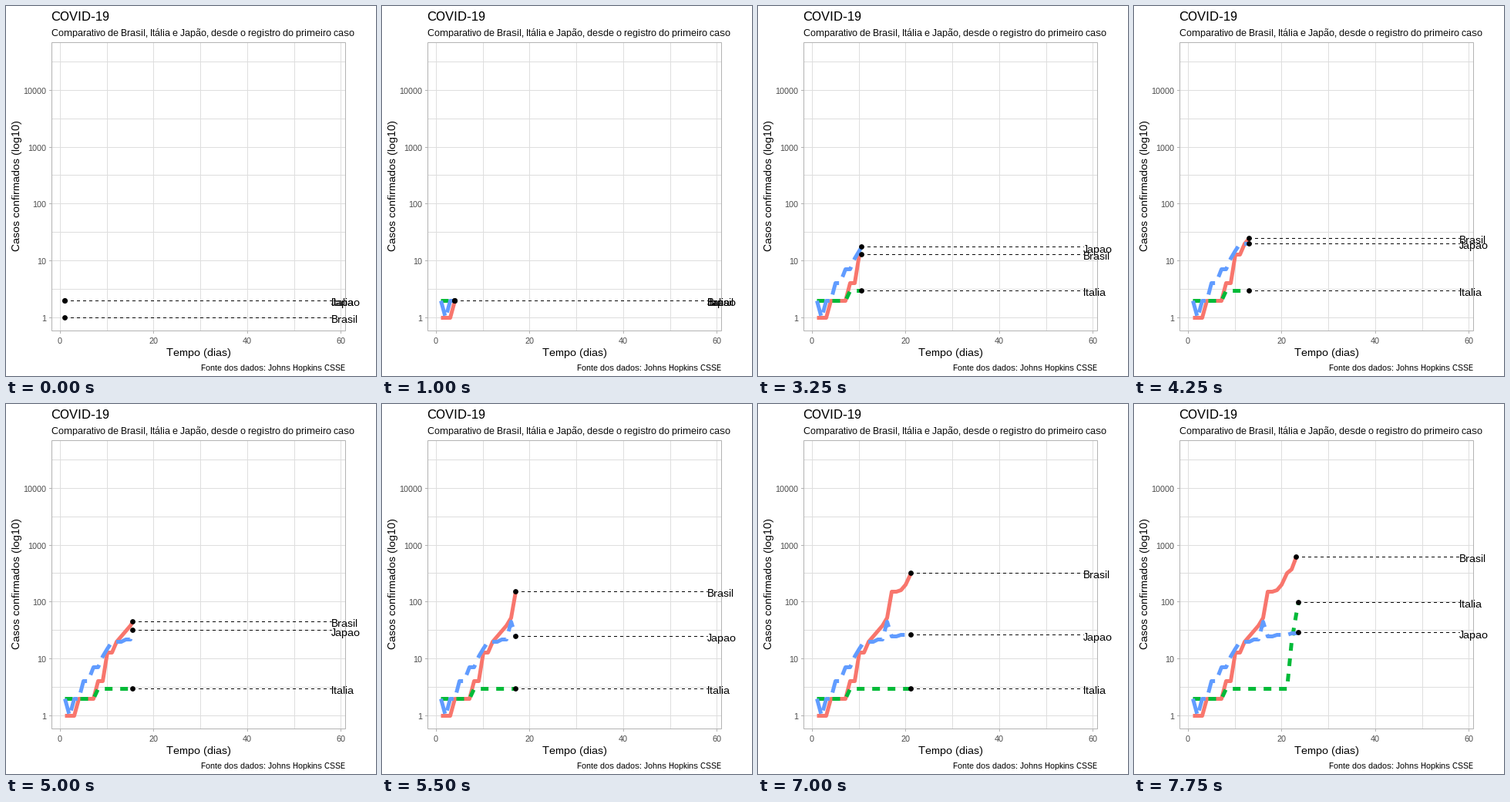
These frames come from a looping animation (480x480 px, 8 s). A matplotlib script:

```python
import numpy as np
import matplotlib.pyplot as plt
from matplotlib.animation import FuncAnimation
from matplotlib.patches import Circle, Rectangle

plt.rcParams.update({
    "font.family": "Liberation Sans",
    "text.hinting": "native",
    "text.hinting_factor": 1,
    "text.kerning_factor": 6,
})

SIZE = 480
LEFT, RIGHT, TOP, BOTTOM = 59.3, 440, 47, 421.3
FRAMES, INTERVAL = 32, 250
LAST_DAY, LAST_FRAME = 58, 79
MAX_CASES = 41035
GRID, BORDER, TICK_TEXT = "#DEDEDE", "#B3B3B3", "#4D4D4D"

# name: (line colour, line style, cumulative cases by day)
SERIES = {
    "Brasil": ("#F8766D", "-", [1, 1, 1, 2, 2, 2, 2, 4, 4, 13, 13, 20, 25, 31,
                                38, 52, 151, 151, 162, 200, 321, 372, 621]),
    "Italia": ("#00BA38", (0, (2, 2)), [2] * 7 + [3] * 14 + [20, 62, 155]),
    "Japao": ("#619CFF", (0, (4, 2)), [2, 1, 2, 2, 4, 4, 7, 7, 11, 15, 20, 20,
                                       20, 22, 22, 45, 25, 25, 26, 26, 26, 28,
                                       28, 29]),
}

DAYS = np.arange(1, LAST_DAY + 1)
KEYS = np.round((DAYS - 1) * LAST_FRAME / (LAST_DAY - 1))


def px(day):
    span = LAST_DAY - 1
    return LEFT + (day - 1 + 0.05 * span) / (1.1 * span) * (RIGHT - LEFT)


def py(log_cases):
    span = np.log10(MAX_CASES)
    return BOTTOM - (log_cases + 0.05 * span) / (1.1 * span) * (BOTTOM - TOP)


def center(v):
    """Middle of the pixel that holds v."""
    return np.floor(v) + 0.5


fig = plt.figure(figsize=(SIZE / 72, SIZE / 72), dpi=72, facecolor="white")
ax = fig.add_axes([0, 0, 1, 1])
ax.set_xlim(0, SIZE)
ax.set_ylim(SIZE, 0)
ax.axis("off")


def stroke(x, y, color, z=1, lw=1, ls="-"):
    return ax.plot(x, y, color=color, zorder=z, lw=lw, ls=ls, snap=False,
                   solid_capstyle="butt", dash_capstyle="butt",
                   solid_joinstyle="round", dash_joinstyle="round")[0]


def label(x, y, text, size, ha="left", color="black", **kw):
    return ax.text(x, y, text, fontsize=size, ha=ha, va="baseline",
                   color=color, zorder=8, **kw)


# Grid, ticks and border
for day in range(0, 61, 10):
    x = center(px(day))
    stroke([x, x], [TOP, 421], GRID)
    if day % 20 == 0:
        stroke([x, x], [421, 425], BORDER)
        label(np.floor(x), 438, str(day), 11, "center", TICK_TEXT)

for half in range(10):
    y = center(py(half / 2))
    stroke([59, RIGHT], [y, y], GRID)
    if half % 2 == 0:
        stroke([56, 59], [y, y], BORDER)
        label(52, y + 4.5, str(10 ** (half // 2)), 11, "right", TICK_TEXT)

ax.add_patch(Rectangle((59.5, 47.5), 381, 374, fill=False, ec=BORDER, lw=1,
                       zorder=2, snap=False))

# Titles
label(58, 19, "COVID-19", 17)
label(59, 39, "Comparativo de Brasil, Itália e Japão, "
              "desde o registro do primeiro caso", 12)
label(249.6, 454, "Tempo (dias)", 14, "center")
label(18, 233.5, "Casos confirmados (log10)", 14, "center",
      rotation=90, rotation_mode="anchor")
label(440, 473, "Fonte dos dados: Johns Hopkins CSSE", 11, "right")


class Curve:
    def __init__(self, name, color, style, cases, z):
        self.logs = np.log10(cases)
        self.days = np.arange(1, len(cases) + 1)
        self.line = stroke([], [], color, z, lw=5, ls=style)
        self.guide = stroke([], [], "black", 6, ls=(0, (4, 4)))
        self.dot = ax.add_patch(Circle((0, 0), 3.4, fc="black", lw=0,
                                       zorder=7, snap=False))
        self.tag = label(422, 0, name, 14)

    def reveal(self, day):
        day = min(day, self.days[-1])
        head = np.interp(day, self.days, self.logs)
        past = self.days < day
        xs = center(px(np.append(self.days[past], day)))
        ys = center(py(np.append(self.logs[past], head)))
        x, y = xs[-1], ys[-1]
        self.line.set_data(xs, ys)
        self.guide.set_data([x - 0.5, px(LAST_DAY)], [y, y])
        self.dot.center = x, y
        self.tag.set_y(py(head) + 6.7)


curves = [Curve(name, *spec, z=3 + i)
          for i, (name, spec) in enumerate(SERIES.items())]


def update(frame):
    day = np.interp(frame, KEYS, DAYS)
    for curve in curves:
        curve.reveal(day)
    return []


anim = FuncAnimation(fig, update, frames=FRAMES, interval=INTERVAL,
                     init_func=lambda: update(0), repeat=True, repeat_delay=0)
plt.show()
```
